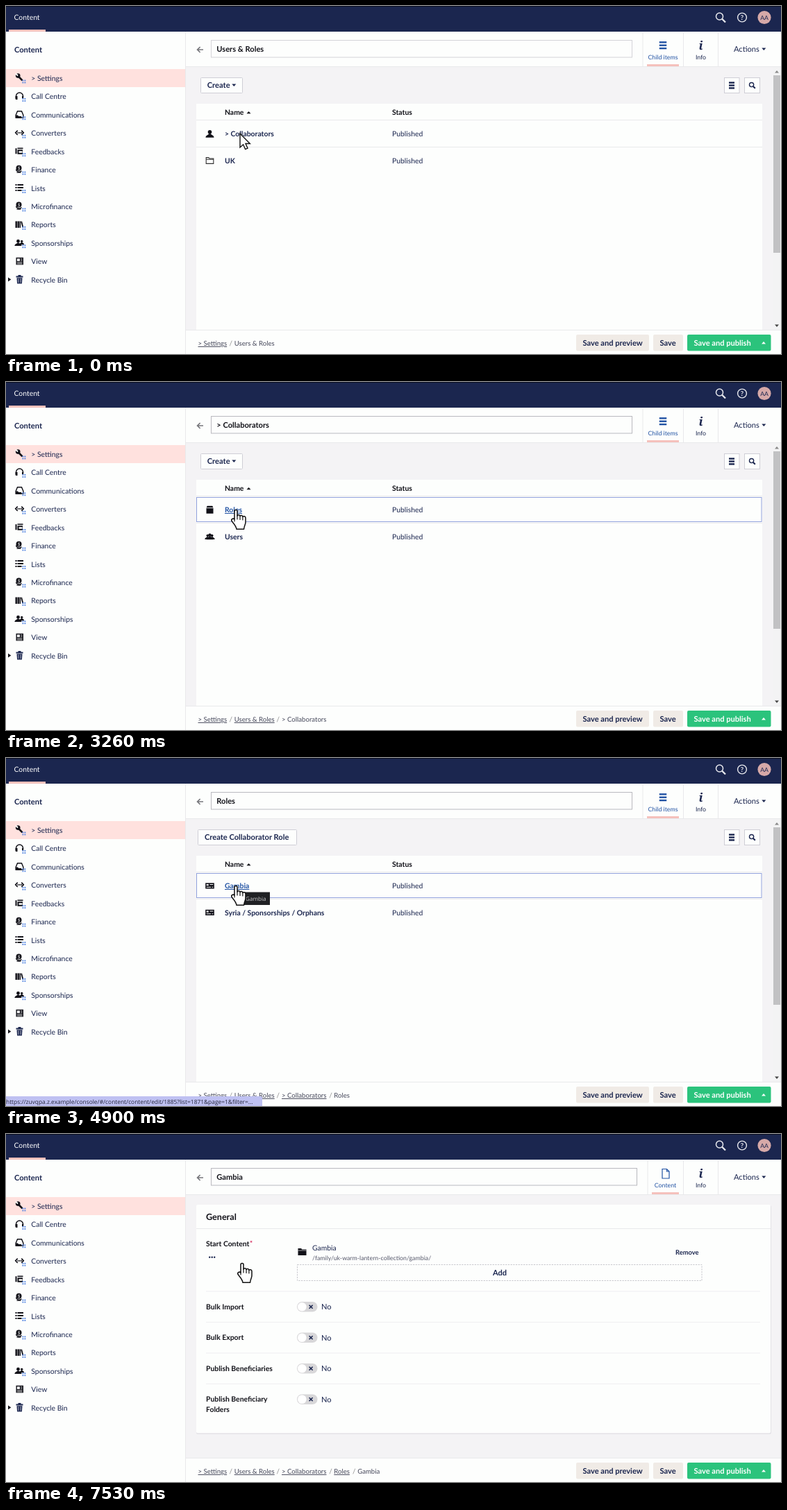
These frames come from a looping animation (1116x502 px, 8000 ms). An HTML page:

```html
<!DOCTYPE html>
<html lang="en">
<head>
<meta charset="utf-8">
<title>Content editor</title>
<style>
html, body { margin: 0; width: 100%; height: 100%; overflow: hidden; background: #fdfefd; }
svg { display: block; width: 1116px; height: 502px; font-family: Lato, sans-serif; text-rendering: geometricPrecision; }
</style>
</head>
<body>
<svg id="stage" viewBox="0 0 1116 502">
  <g id="chrome"></g>
  <g id="main"></g>
  <rect id="bar" y="113" width="258" height="2" fill="#3585ec"/>
  <g id="status"></g>
  <g id="tip"></g>
  <path id="arrow" d="M0 0V20L4.6 15.8 7.6 22.6 11 21.2 8 14.5H14.3Z" fill="#fff" stroke="#111" stroke-width="1.4" transform="translate(337 184)"/>
  <g id="hand" fill="#fff" stroke="#111" stroke-width="1.5" stroke-linejoin="round" stroke-linecap="round">
    <path d="M5 14V2.6C5-.2 9-.2 9 2.6V9C9.5 7 13 7.2 13 9.6 13.6 8 16.6 8.3 16.9 10.4 17.8 9.2 21 9.5 21 12V18C21 22 19 23 18.6 28.3H8C7.5 24 4.5 21 1.2 16.8-.4 14 2.6 12 5 14Z"/>
    <path d="M5 14V17M9 9V14M13 9.6V14.5M16.9 10.4V15" fill="none" stroke-width="1.2"/>
  </g>
</svg>
<script>
const NAVY = '#1b264f', BLUE = '#2152a3', PINK = '#f5c1bc', INK = '#111118', GRAY = '#f4f3f5', LINE = '#e9e9eb', WHITE = '#fdfefd';
const LOOP = 8000;
const $ = id => document.getElementById(id);
const esc = s => s.replace(/&/g, '&amp;').replace(/</g, '&lt;').replace(/>/g, '&gt;');

// Drawing helpers; text is placed by its vertical middle.
const text = (x, y, s, size = 10.4, fill = NAVY, extra = '') =>
  `<text x="${x}" y="${y + size * .36}" font-size="${size}" fill="${fill}" ${extra}>${esc(s)}</text>`;
const bold = (x, y, s, size = 10.4, fill = NAVY, extra = '') => text(x, y, s, size, fill, 'font-weight="700" ' + extra);
const rect = (x, y, w, h, fill, extra = '') => `<rect x="${x}" y="${y}" width="${w}" height="${h}" fill="${fill}" ${extra}/>`;
const frame = (x, y, w, h, stroke, fill = 'none', extra = '') =>
  rect(x + .5, y + .5, w - 1, h - 1, fill, `stroke="${stroke}" ${extra}`);
const line = (d, stroke = INK, w = 1.4) => `<path d="${d}" fill="none" stroke="${stroke}" stroke-width="${w}"/>`;
const fill = (d, color = INK) => `<path d="${d}" fill="${color}"/>`;
const dot = (x, y, r, color = INK, extra = '') => `<circle cx="${x}" cy="${y}" r="${r}" fill="${color}" ${extra}/>`;
const at = (x, y, s) => `<g transform="translate(${x} ${y})">${s}</g>`;
const down = (x, y, c = NAVY) => fill(`M${x - 3} ${y - 1.5}h6l-3 3.4z`, c);
const up = (x, y, c = NAVY) => fill(`M${x - 3} ${y + 1.5}h6l-3 -3.4z`, c);
const bars = (x, y, w, c, gap = 4) => [-1, 0, 1].map(i => rect(x - w / 2, y + i * gap - 1.2, w, 2.4, c)).join('');
const lens = (x, y, r, c, w) => dot(x - r * .3, y - r * .3, r, 'none', `stroke="${c}" stroke-width="${w}"`) +
  line(`M${x + r * .45} ${y + r * .45}L${x + r * 1.4} ${y + r * 1.4}`, c, w * 1.5);

const coin = dot(-1, -2, 4, INK) + text(-2.6, -2, '$', 6, WHITE) + line('M-5 0a4.5 4 0 0 0 8 2M-4 4.5h6', INK, 1.3);
const person = dot(0, -2.6, 2.8) + fill('M-6 5.5C-6 2-2 2-1.5 0h3C2 2 6 2 6 5.5z');
const group = at(-3.2, .5, `<g transform="scale(.65)">${person}</g>`) + at(3.2, .5, `<g transform="scale(.65)">${person}</g>`) + `<g transform="scale(.8)">${person}</g>`;
const icons = {
  wrench: dot(-2.3, -3, 3.3) + line('M-2 -2.5L4 3.8', INK, 2.8) + line('M-2.5 -3.2L-5.5 -6', WHITE, 2),
  headset: line('M-5 3.5V0a5 5 0 0 1 10 0V1') + fill('M-6 0h3v5h-2q-1 0-1-2zM3.5 0h2.2v3H3.5z'),
  tray: line('M-5.4 1L-3 -4.7H3L5.4 1V4.6H-5.4Z') + fill('M-5.4 1h3l1 1.6h4V5.2h-8z'),
  convert: line('M-2.8 -3.2L-5.8 0L-2.8 3.2M2.8 -3.2L5.8 0L2.8 3.2', INK, 1.6) + rect(-3, -.8, 1.7, 1.7, INK) + rect(-.6, -.8, 1.7, 1.7, INK) + rect(1.9, -.8, 1.7, 1.7, INK),
  feedback: rect(-6, -4, 2, 8, INK) + rect(-3, -2, 7.5, 6.5, INK) + rect(-1, 0, 5, 2.5, WHITE) + line('M-3 -4H5', INK, 1.6),
  coin,
  list: line('M-6 -4h2M-6 0h2M-6 4h2M-3 -4H5.5M-3 0H5.5M-3 4H3', INK, 2),
  books: rect(-6, -4.5, 2.4, 9.5, INK) + rect(-3, -4.5, 2.4, 9.5, INK) + rect(0, -4.5, 1.6, 9.5, INK) + line('M2.6 -4.3L5 4.5', INK, 1.8),
  people: at(-2, 0, `<g transform="scale(.85)">${person}</g>`) + at(3.2, -.5, `<g transform="scale(.6)">${person}</g>`),
  view: frame(-5, -5, 10.5, 10.5, INK, INK) + rect(-3.6, -3.4, 4, 3.6, WHITE) + line('M-3.6 2H4M-3.6 4H4M1.6 -2.8H4M1.6 -.6H4', WHITE, .8),
  bin: fill('M-5 -4.6h3v-1.6h4v1.6h3v1.8h-10zM-4 -2h8l-.6 8.4h-6.8z', NAVY) + line('M-1.6 -1v6M1.6 -1v6', WHITE, .7),
};
const menu = [['> Settings', 'wrench'], ['Call Centre', 'headset'], ['Communications', 'tray'], ['Converters', 'convert'],
  ['Feedbacks', 'feedback'], ['Finance', 'coin'], ['Lists', 'list'], ['Microfinance', 'coin'], ['Reports', 'books'],
  ['Sponsorships', 'people'], ['View', 'view'], ['Recycle Bin', 'bin']];
const badge = [0, 3].map(x => [0, 3].map(y => rect(4 + x, 3 + y, 1.8, 1.8, '#4b7fe0')).join('')).join('');

$('chrome').innerHTML =
  rect(0, 0, 1116, 37, NAVY) + rect(0, 0, 1116, 1, '#080c1c') + text(11.5, 16.5, 'Content', 10.4, '#fff') +
  rect(4, 34, 53, 3, PINK) + lens(1029, 16.5, 5, '#e8e9ee', 1.5) +
  dot(1060, 16.5, 6.4, 'none', 'stroke="#e8e9ee" stroke-width="1.4"') + bold(1060, 16.7, '?', 9.5, '#e8e9ee', 'text-anchor="middle"') +
  dot(1092, 16.5, 9.6, '#d6a9a8') + text(1092, 16.7, 'AA', 8.6, NAVY, 'text-anchor="middle"') +
  rect(0, 37, 259, 465, WHITE) + bold(12, 63.5, 'Content', 11.1) + rect(0, 91, 259, 26, '#ffe1de') +
  menu.map(([label, icon], i) => {
    const y = 104.3 + i * 26.42;
    return at(19.5, y - .7, icons[icon] + (i < 10 ? badge : '')) + text(36.3, y, label);
  }).join('') + fill('M3 391.5l4.3 3 -4.3 3z', INK);

const rowIcons = {
  person,
  folder: line('M-5.3 4.6V-4.2h3.6l1.2 1.4H5.3V4.6ZM-5.3 -1.6H5.3', '#333', 1.1),
  box: fill('M-3.8 -5.5h7.6l1.2 2.6h-10zM-5 -2.2H5V5.5H-5z') + line('M-5 -2.6H5', WHITE, .7),
  group,
  card: rect(-6.3, -4, 12.6, 8.2, INK) + rect(-4.8, -2.4, 3, 2.2, WHITE) + line('M0 -1.8H4.8M-4.8 2H1.5M3 2H4.8', WHITE, 1),
};
const pages = [
  { title: 'Users & Roles', create: 'Create', rows: [['> Collaborators', 'person', 386], ['UK', 'folder', 330]] },
  { title: '> Collaborators', create: 'Create', rows: [['Roles', 'box', 340], ['Users', 'group', 341]], caret: 378.5 },
  { title: 'Roles', create: 'Create Collaborator Role', rows: [['Gambia', 'card', 350], ['Syria / Sponsorships / Orphans', 'card', 454]], caret: 330.5 },
  { title: 'Gambia', form: true, caret: 340.5 },
];
const crumbs = [[276.5, '> Settings'], [328.7, 'Users & Roles'], [397, '> Collaborators'], [472.3, 'Roles'], [506.2, 'Gambia']];
const slashes = [321.5, 389.5, 465.3, 499];

const trail = depth => crumbs.slice(0, depth + 2).map(([x, s], i) =>
  text(x, 486.5, s, 9.6, '#45475a', i <= depth ? 'text-decoration="underline"' : '') +
  (i <= depth ? text(slashes[i], 486, '/', 10, '#888') : '')).join('');

function shell(page, depth, s) {
  const edge = page.form ? 909 : 902, tab = page.form ? 949.5 : 946, half = page.form ? 19.5 : 23;
  const icon = page.form
    ? line('M945 50.5h6.5l3.5 3.5v10h-10zM951.5 50.5v3.5h3.5', BLUE, 1.2)
    : bars(946, 56.7, 10.5, BLUE, 4.4);
  const c = s.ready ? NAVY : '#c3c3c8';
  return rect(259, 37, 857, 50, WHITE) + rect(259, 87, 857, 1, LINE) +
    line('M284 63H276M279.6 59L275.6 63L279.6 67', '#77777c', 1.7) +
    frame(295, 49, edge - 295, 25.5, s.focus ? '#b9b9bf' : '#d4d3d8', WHITE) + bold(303.3, 62, page.title, 11.1, INK) +
    (s.caret ? rect(page.caret - .5, 55, 1, 14, INK) : '') +
    rect(tab - half - 6.5, 38, 1, 49, LINE) + rect(975, 38, 1, 49, LINE) + rect(1025, 38, 1, 49, LINE) +
    icon + text(tab, 74.3, page.form ? 'Content' : 'Child items', 8.8, BLUE, 'text-anchor="middle"') +
    rect(tab - half, 84, half * 2, 3, PINK) +
    `<text x="1000.5" y="63" font-family="Noto Serif, serif" font-style="italic" font-weight="700" font-size="17" text-anchor="middle" fill="${NAVY}">i</text>` +
    text(1000.5, 74.3, 'Info', 8.8, NAVY, 'text-anchor="middle"') + text(1048, 62.5, 'Actions', 11.1, c) + down(1091.3, 62, c) +
    rect(259, 468, 857, 34, WHITE) + rect(259, 467, 857, 1, LINE) + (s.ready ? trail(depth) : '') +
    rect(821, 474, 105, 23.5, '#f0ebe6', 'rx="2"') + bold(830.5, 486, 'Save and preview', 11.1) +
    rect(932, 474, 43, 23.5, '#f0ebe6', 'rx="2"') + bold(941.5, 486, 'Save', 11.1) +
    rect(981, 474, 120.5, 23.5, '#2bc37c', 'rx="2"') + bold(990.5, 486, 'Save and publish', 11.1, '#fff') + up(1091, 486, '#fff');
}

const tools = dx => at(dx, 0, frame(1034, 103, 22.5, 23, '#cfced6', WHITE) + bars(1045, 114.5, 8, NAVY, 3.9) +
  frame(1063, 103, 23, 23, '#cfced6', WHITE) + lens(1074.5, 114.5, 3.1, NAVY, 1.4));

function list(page, s) {
  const menuBtn = page.create === 'Create';
  const btn = menuBtn
    ? frame(280, 103, 61, 23, '#cfced6', WHITE, 'rx="1"') + bold(289.8, 114.5, 'Create', 11.1) + down(328.3, 114, NAVY)
    : frame(276, 103, 143, 23, '#cfced6', WHITE, 'rx="1"') + bold(286, 114.5, page.create, 11.1);
  return btn + tools(0) + rect(274, 141, 815, 326, WHITE) + rect(274, 164, 815, 1, LINE) + rect(274, 203, 815, 1, LINE) +
    bold(315, 153, 'Name', 10.4, INK) + up(349.5, 153.8, INK) + bold(556, 153, 'Status', 10.4, INK) +
    page.rows.map(([name, icon], i) => {
      const y = 184.3 + i * 38.5, on = s.link === i;
      return (s.row === i ? frame(274, 166 + i * 38.5, 814.5, 36, '#91a1dc') : '') + at(293.5, y, rowIcons[icon]) +
        bold(315, y, name, 10.4, on ? BLUE : NAVY, on ? 'text-decoration="underline"' : '') + text(556, y, 'Published');
    }).join('') +
    rect(1104, 88, 12, 379, '#f3f3f4') + rect(1105, 100, 10, 256, '#c1c1c3') + up(1110, 95, '#888') + down(1110, 461, '#444');
}

function form(full) {
  const flags = [['Bulk Import', 249], ['Bulk Export', 293.5], ['Publish Beneficiaries', 338], ['Publish Beneficiary', 382.5]];
  const picked = at(426.5, 170, fill('M-6 -5h4.6l1.2 1.6H6V5H-6z') + line('M-6 -2H6', WHITE, .6)) + text(441, 164.5, 'Gambia') +
    text(441, 178.5, '/family/uk-warm-lantern-collection/gambia/', 8.8, '#55576a') + bold(964, 170.8, 'Remove', 9.4);
  return rect(274, 103, 828, 330, '#e3e2e6', 'rx="2"') + rect(274, 102, 827, 329.5, WHITE, 'rx="2"') + rect(274, 136, 827, 1, LINE) +
    bold(288, 119, 'General', 12.6, INK) + bold(288, 158.5, 'Start Content', 10.4, INK) + bold(351, 157.5, '*', 9.6, '#d42054') +
    [293.2, 296.7, 300.2].map(x => dot(x, 177.8, 1.2, NAVY)).join('') + (full ? picked : '') +
    frame(419, 188, 583.5, 24, '#c6c6cc', 'none', 'stroke-dasharray="2.2 1.5"') + bold(711, 200.5, 'Add', 11.1, NAVY, 'text-anchor="middle"') +
    flags.map(([label, y]) => rect(288, y - 22.5, 798, 1, '#f0eff1') + bold(288, y, label, 10.4, INK) +
      rect(419, y - 7, 29.5, 14.5, '#d8d7d9', 'rx="7.2"') + dot(426.3, y + .2, 6.3, '#fff') +
      line(`M436.6 ${y - 2.3}l5 5m0 -5l-5 5`, NAVY, 1.6) + text(454, y + .5, 'No', 11.1)).join('') +
    bold(288, 397.5, 'Folders', 10.4, INK);
}

// Three bullets that shrink one after another.
const loader = (y, ms) => [0, 1, 2].map(i => {
  const dip = Math.max(0, 1 - Math.abs(ms % 900 - 130 - 130 * i) / 150);
  return dot(675 + i * 11.7, y, 3.1 - 1.4 * dip, BLUE, `fill-opacity="${dip}" stroke="${BLUE}" stroke-width="${1.5 - .5 * dip}"`);
}).join('');

// Per visit: click, editor shown, data shown.
const visits = [[-1, -1, -1], [1000, 1330, 1600], [3430, 4100, 4300], [6630, 7000, 7200]];
const carets = [[1360, 1860], [2360, 2900], [4130, 4660], [5180, 5730], [6230, 6400], [7030, 7530]];
const blurs = [[0, 1330], [3400, 4100], [6415, 7000]];
const links = [[100, 1330, '1766?list=1765'], [3430, 4100, '1871?list=1766'], [4360, 5150, '1885?list=1871'],
  [5150, 6150, '2052?list=1871'], [6150, 7000, '1885?list=1871']];
const tips = [[560, 760, 349, 69, '> Collaborators'], [4900, 5010, 340, 40, 'Gambia']];
const moves = [[560, 600, 333, 184], [3130, 3260, 324, 184], [5000, 5300, 338, 222], [5730, 6260, 333, 186]];
const during = (spans, t) => spans.find(([a, b]) => t >= a && t < b);

function hand(t) {
  let x = 331, y = 183;
  for (const [a, b, nx, ny] of moves) {
    const p = Math.min(1, Math.max(0, (t - a) / (b - a))), k = 1 - (1 - p) ** 2;
    x += (nx - x) * k;
    y += (ny - y) * k;
  }
  return [x, y];
}

function scene(t, x, y) {
  let depth = 0;
  visits.forEach(([click], i) => { if (t >= click) depth = i; });
  const [click, open, data] = visits[depth], page = pages[depth];
  const bg = rect(259, 37, 857, 465, GRAY) + rect(258, 37, 1, 465, LINE);
  if (t < open) return bg + loader(269, t - click);
  const s = { ready: t >= data, focus: !during(blurs, t), caret: !!during(carets, t), row: -1, link: -1 };
  let body;
  if (page.form) body = form(s.ready);
  else if (!s.ready) body = tools(12.5) + loader(138, t - open);
  else {
    if (t >= 30) {
      s.row = y < 204 ? 0 : 1;
      const near = Math.abs(y - 184 - 38.5 * s.row) < 6.8;
      if (near && x + 7 < page.rows[s.row][2]) s.link = s.row;
    }
    body = list(page, s);
  }
  return bg + body + shell(page, depth, s);
}

const cache = {};
function put(id, html) {
  if (cache[id] !== html) $(id).innerHTML = cache[id] = html;
}

function render(t) {
  const [x, y] = hand(t), url = during(links, t), tip = during(tips, t);
  put('main', scene(t, x, y));
  const load = visits.find(([click, open]) => click > 0 && t >= open && t < open + 300);
  $('bar').setAttribute('x', load ? -258 + .516 * (t - load[1]) : -300);
  put('status', url ? rect(-3, 488, 372, 17, '#bfc1f2', 'rx="3"') +
    text(0, 495.8, `https://zuvqpa.z.example/console/#/content/content/edit/${url[2]}&page=1&filter=...`, 8.4, '#23243a', 'font-family="Open Sans, sans-serif"') : '');
  put('tip', tip ? rect(tip[2], 193.5, tip[3], 18.5, '#202124') +
    text(tip[2] + 5, 202.8, tip[4], 8.1, '#c9c9cc', 'font-family="Open Sans, sans-serif"') : '');
  $('arrow').style.display = t < 30 ? '' : 'none';
  $('hand').style.display = t < 30 ? 'none' : '';
  $('hand').setAttribute('transform', `translate(${x} ${y})`);
}

let start;
function tick(now) {
  start ??= now;
  render((now - start) % LOOP);
  requestAnimationFrame(tick);
}
render(0);
requestAnimationFrame(tick);
</script>
</body>
</html>
```
